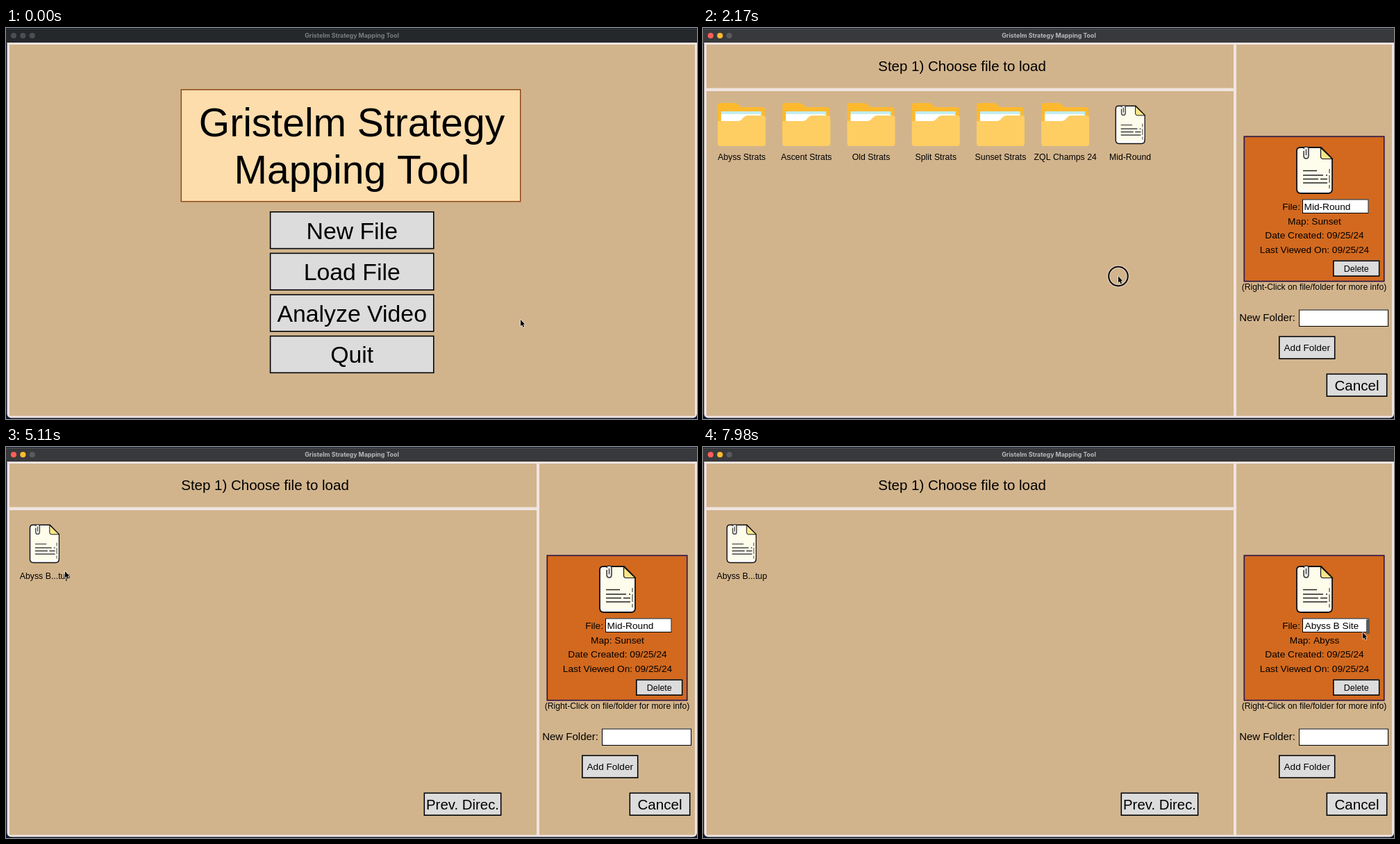
An HTML page with a canvas for the animation above (8000 ms loop, 995x563 px).

```html
<!DOCTYPE html>
<html lang="en">
<head>
<meta charset="utf-8">
<title>Strategy Mapping Tool</title>
<style>
  html, body { margin: 0; width: 100%; height: 100%; overflow: hidden; background: #0b1428; }
  canvas { display: block; }
</style>
</head>
<body>
<canvas width="995" height="563"></canvas>
<script>
const ctx = document.querySelector('canvas').getContext('2d');
const LOOP = 8000, TICK = 70;
const TAN = '#d2b48c', PALE = '#f0e4e0', GREY = '#dcdcdc', HOVER = '#808080';
const SANS = '"Liberation Sans", Arial, sans-serif';

// Pointer moves: start ms, end ms, target x, target y
const START = [741, 420];
const MOVES = [
  [770, 840, 742, 420],
  [1190, 1820, 598, 358],
  [1890, 1960, 598, 357.6],
  [2800, 3290, 193, 281],
  [3500, 4130, 76, 164],
  [4480, 4830, 98, 194],
  [4830, 5110, 85, 179],
  [5110, 5320, 66, 158],
  [6230, 6650, 400, 322],
  [6930, 7350, 660, 333],
  [7350, 7770, 947, 282],
  [7770, 7980, 950, 267],
];
const CLICKS = [[2100, 2310], [4200, 4410], [5810, 6020]];
const ACTIVATE = 1050, OPEN_LOADER = 2170, OPEN_FOLDER = 4270, SHOW_INFO = 5810;

function pointerAt(t) {
  let [x, y] = START;
  for (const [t0, t1, tx, ty] of MOVES) {
    if (t < t0) break;
    const p = Math.min(1, (t - t0) / (t1 - t0));
    const e = p * p * (3 - 2 * p);
    x += (tx - x) * e;
    y += (ty - y) * e;
  }
  return { x, y };
}

const inside = (p, x, y, w, h) => p.x >= x && p.x < x + w && p.y >= y && p.y < y + h;

function text(str, x, y, size, align = 'center', color = '#000', font = SANS, weight = 400) {
  ctx.font = `${weight} ${size}px ${font}`;
  ctx.textAlign = align;
  ctx.fillStyle = color;
  ctx.fillText(str, x, y);
}

function fillBox(x, y, w, h, color) {
  ctx.fillStyle = color;
  ctx.fillRect(x, y, w, h);
}

function box(x, y, w, h, fill, stroke = '#000', line = 1.6) {
  fillBox(x, y, w, h, fill);
  ctx.strokeStyle = stroke;
  ctx.lineWidth = line;
  ctx.strokeRect(x + line / 2, y + line / 2, w - line, h - line);
}

function button(label, x, y, w, h, size, fill = GREY) {
  box(x, y, w, h, fill);
  text(label, x + w / 2, y + h / 2 + size * 0.365, size);
}

function shape(d, fill, stroke, line = 1) {
  const path = new Path2D(d);
  if (fill) { ctx.fillStyle = fill; ctx.fill(path); }
  if (stroke) { ctx.strokeStyle = stroke; ctx.lineWidth = line; ctx.stroke(path); }
}

function at(x, y, scale, draw) {
  ctx.save();
  ctx.translate(x, y);
  ctx.scale(scale, scale);
  draw();
  ctx.restore();
}

function disc(x, y, r, color) {
  ctx.fillStyle = color;
  ctx.beginPath();
  ctx.arc(x, y, r, 0, 7);
  ctx.fill();
}

function frame(active) {
  fillBox(0, 0, 995, 563, '#0d1830');
  fillBox(0, 1, 995, 21, active ? '#38393c' : '#25282b');
  fillBox(1, 1, 993, 1, active ? '#55565a' : '#3a3d42');
  const lights = active ? ['#fe5f57', '#febc2e', '#5a5b5e'] : Array(3).fill('#4b4e53');
  lights.forEach((color, i) => disc(11 + i * 13.4, 11, 4.1, color));
  text('Gristelm Strategy Mapping Tool', 498, 14, 8.8, 'center',
    active ? '#b7b8b9' : '#7b7d7f', 'Inter, sans-serif', 700);
  ctx.fillStyle = PALE;
  ctx.beginPath();
  ctx.roundRect(1.5, 21, 993.5, 540.5, [0, 0, 6, 6]);
  ctx.fill();
  fillBox(5, 24, 987, 534.5, TAN);
}

function menu(pointer) {
  box(251.5, 88, 490, 162.6, '#fdddac', '#8b4513', 1.5);
  text('Gristelm Strategy', 498, 155.5, 57);
  text('Mapping Tool', 498, 223.5, 57);
  ['New File', 'Load File', 'Analyze Video', 'Quit'].forEach((label, i) => {
    const rect = [379.8, 264 + i * 59.6, 236.8, 54.4];
    button(label, ...rect, 33.8, inside(pointer, ...rect) ? HOVER : GREY);
  });
}

function folder(x) {
  at(x - 34.5, 107, 1, () => {
    shape('M0 5Q0 1 4 1H24Q27 1 29 3L34 7H64Q68 7 68 11V50H0Z', '#fdb92e');
    shape('M5 13H63V34H5Z', '#c3ecee');
    shape('M5 17H58Q63 17 63 21V34H5Z', '#fff');
    shape('M0 27H29Q33 27 36 23L38 21Q40 19 43 19H65Q69 19 69 23V59Q69 63 65 63H4Q0 63 0 59Z', '#ffce63');
  });
}

function page(x, y, scale) {
  at(x, y, scale, () => {
    shape('M6 1H36L52 17V61Q52 67 46 67H7Q1 67 1 61V6Q1 1 6 1Z', '#fff', '#111', 1.8);
    shape('M8 2H35V17H51V58Q51 62 46 62H9Q5 62 5 58V5Q5 2 8 2Z', '#fefceb');
    shape('M35.5 1.5L52 17.5H39Q35.5 17.5 35.5 14Z', '#fbe58a', '#111', 1.2);
    shape('M10 34.5H30M10 41H39M43 41H45M10 46.5H32M35 46.5H45M10 52H45', null, '#222', 1.3);
    shape('M48 32V38M48 41V52M48 55V60', null, '#222', 1);
    shape('M11 6V13Q11 17 14.5 17Q18 17 18 13V3Q18 0 14.5 0Q11 0 11 3', '#e8e8e4', '#333', 1.5);
    shape('M14.5 4V12', null, '#333', 1.2);
  });
}

function sidePanel(showInfo) {
  box(778.5, 155.5, 203, 210, '#d2691e', '#2a1a52', 1.6);
  page(854, 171, 1);
  text('File:', 860, 262, 13.7, 'right');
  box(863, 246.5, 95.5, 20.5, '#fff', '#000', 1);
  text(showInfo ? 'Abyss B Site' : 'Mid-Round', showInfo ? 866.5 : 865.5, 262, 13.7, 'left');
  if (showInfo) fillBox(955, 248.5, 5, 20.5, '#5c5c5c');
  text('Map: ' + (showInfo ? 'Abyss' : 'Sunset'), 880.5, 283, 13.7);
  text('Date Created: 09/25/24', 880.5, 303, 13.7);
  text('Last Viewed On: 09/25/24', 880.5, 323.5, 13.7);
  button('Delete', 907, 334.5, 67.5, 23.5, 12.4);
  text('(Right-Click on file/folder for more info)', 880, 377, 12.2);
  text('New Folder:', 853, 422, 15, 'right');
  box(858, 405.5, 129, 24.5, '#fff', '#000', 1);
  button('Add Folder', 829, 443.5, 81.5, 33.5, 13.6);
  button('Cancel', 897.5, 497.5, 88, 33.5, 20.6);
}

function loader(t, pointer) {
  fillBox(5, 86.5, 760, 4.5, PALE);
  fillBox(764, 24, 4, 535, PALE);
  text('Step 1) Choose file to load', 373, 61.8, 20.5);
  if (inside(pointer, 17, 100, 78, 78)) fillBox(17, 100, 78, 78, HOVER);
  const label = (name, x) => text(name, x, 189.5, 12.3);
  if (t < OPEN_FOLDER) {
    const names = ['Abyss Strats', 'Ascent Strats', 'Old Strats', 'Split Strats', 'Sunset Strats', 'ZQL Champs 24'];
    names.forEach((name, i) => {
      const x = 55.7 + i * 93.2;
      folder(x);
      label(name, x);
    });
    page(593.5, 111.5, 0.82);
    label('Mid-Round', 615);
  } else {
    page(33.7, 111.5, 0.82);
    label('Abyss B...tup', 56);
    button('Prev. Direc.', 601.5, 497.5, 112, 33.5, 20.4);
  }
  sidePanel(t >= SHOW_INFO);
}

function ring(r, color, line) {
  ctx.strokeStyle = color;
  ctx.lineWidth = line;
  ctx.beginPath();
  ctx.arc(0, 0, r, 0, 7);
  ctx.stroke();
}

function cursor({ x, y }, clicking) {
  at(x, y, 1, () => {
    if (clicking) {
      ring(13.8, 'rgba(255,255,255,.55)', 4);
      ring(13.8, '#0a0a0a', 2.1);
    }
    const arrow = 'M0 0V9.2L2.1 7.3L3.6 10.8L5.2 10.1L3.7 6.7H6.3Z';
    ctx.lineJoin = 'round';
    shape(arrow, null, 'rgba(255,255,255,.85)', 1.3);
    shape(arrow, '#000');
  });
}

function render(now) {
  const t = Math.floor((now % LOOP) / TICK) * TICK;
  const pointer = pointerAt(t);
  frame(t >= ACTIVATE);
  if (t < OPEN_LOADER) menu(pointer);
  else loader(t, pointer);
  cursor(pointer, CLICKS.some(([from, to]) => t >= from && t < to));
}

const begin = performance.now();
function loop() {
  render(performance.now() - begin);
  requestAnimationFrame(loop);
}
loop();
</script>
</body>
</html>
```
